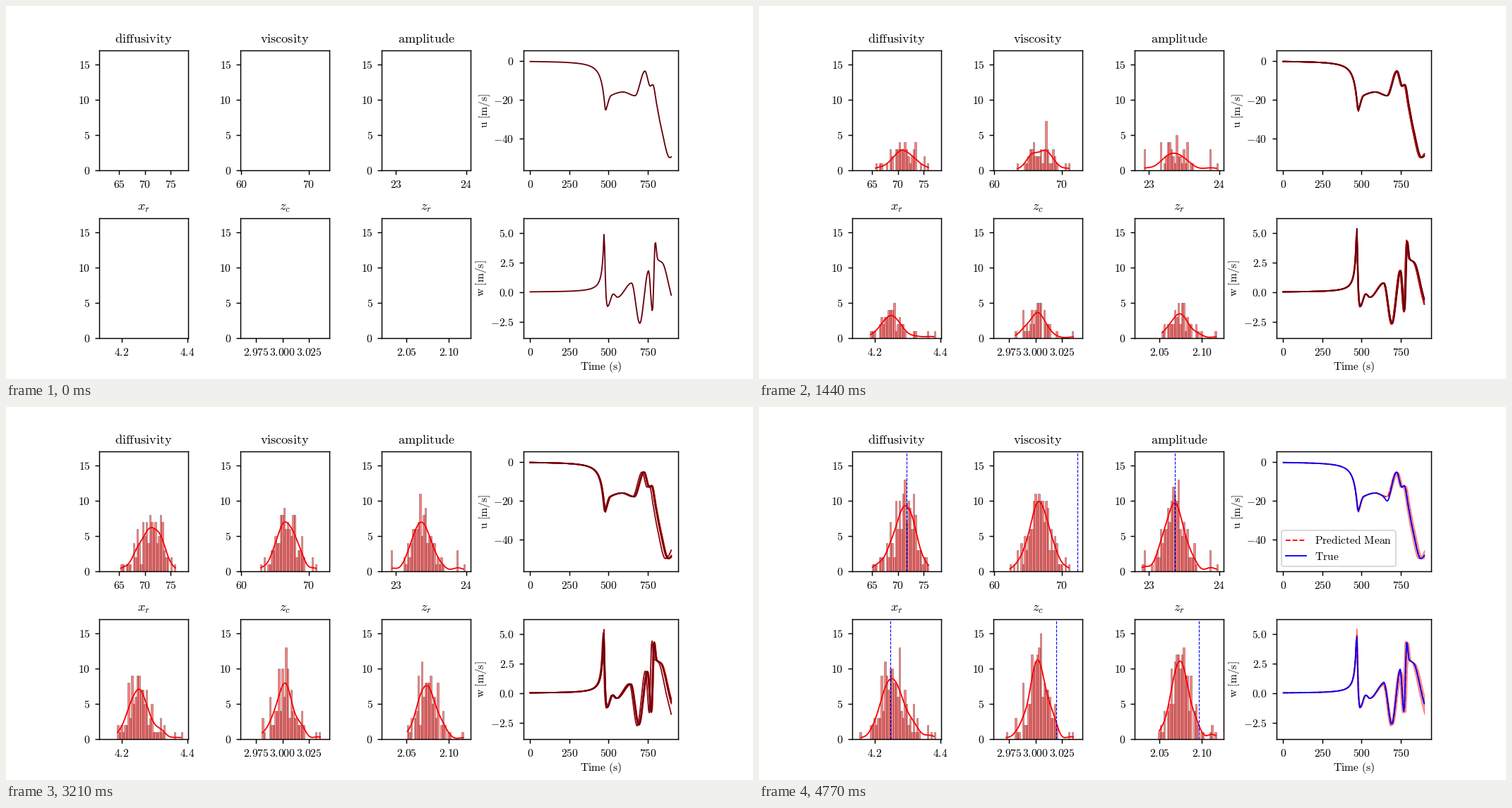
A matplotlib script that plays this animation: 1058x529 px, repeating every 6.45 s.

```python
import numpy as np
import matplotlib.pyplot as plt
from matplotlib.animation import FuncAnimation
from matplotlib.collections import PolyCollection

FRAMES, STEP_MS = 215, 30
RUNS, FADE, WINDOW, BINS = 150, 9, 8, 50

plt.rcParams.update({"font.size": 8.5, "axes.titlesize": 9.9,
                     "axes.labelpad": 1.6, "mathtext.fontset": "cm"})
rng = np.random.default_rng(11)


def rm(text):
    """Upright Computer Modern text."""
    return r"$\mathrm{%s}$" % text.replace(" ", r"\ ")


def smooth(points):
    """Monotone cubic curve through the points."""
    x, y = np.array(points, float).T
    h = np.diff(x)
    d = np.diff(y) / h
    m = np.zeros_like(y)
    m[0], m[-1] = d[0], d[-1]
    i = np.flatnonzero(d[1:] * d[:-1] > 0)
    m[i + 1] = 2 * d[i] * d[i + 1] / (d[i] + d[i + 1])

    def curve(t):
        j = np.clip(np.searchsorted(x, t) - 1, 0, len(h) - 1)
        s = (t - x[j]) / h[j]
        return (y[j] * (1 + 2 * s) * (1 - s) ** 2
                + y[j + 1] * s ** 2 * (3 - 2 * s)
                + h[j] * s * (1 - s) * (m[j] * (1 - s) - m[j + 1] * s))
    return curve


def gust(scale, power, points):
    """Sharp build-up to the first point, then a smooth curve."""
    t0, peak = points[0]
    after = smooth(points)

    def curve(t):
        before = peak / (1 + (np.maximum(t0 - t, 0) / scale) ** power)
        return np.where(t < t0, before, after(np.maximum(t, t0)))
    return curve


u_base = gust(21.3, 1.4, [
    (481, -25.8), (516, -17.8), (593, -16), (669, -17.9), (732, -5.2),
    (766, -13), (782, -12.2), (809, -23.2), (836, -34.4), (890, -49.7),
    (980, -36)])
w_base = gust(9.6, 1.3, [
    (472, 5.36), (484, -.36), (493, -1.2), (530, -.15), (557, -.42),
    (647, .77), (699, -2.63), (755, 1.81), (780, -1.61), (798, 4.28),
    (813, 2.79), (845, 2.46), (900, -.24), (980, -4)])

time = np.linspace(0, 900, 200)


def warped(shift):
    """Times read earlier by an amount that grows along the run."""
    return time + shift * (time / 800) ** 2.2


def u_run(shift):
    return u_base(warped(shift))


def w_run(shift):
    return w_base(warped(shift)) * (1 + .002 * shift)


def bump(center, width):
    return np.exp(-.5 * ((time - center) / width) ** 2)


shifts = 8 + 3.5 * rng.standard_t(4, RUNS + 1)
shifts[0] = 0


def draw_samples(mode, sd, skew, low, high):
    """Shuffled draws from a skewed bell; both extremes arrive late."""
    z = rng.normal(size=6000)
    pool = mode + sd * (z + .05 * z ** 3 + skew * z ** 2)
    pool = pool[(pool > low) & (pool < high)]
    rank = (np.arange(RUNS) + .5 + rng.normal(0, 3, RUNS)) / RUNS
    x = rng.permutation(np.quantile(pool, np.clip(rank, .003, .997)))
    x[RUNS // 4], x[RUNS * 3 // 4] = high, low
    return x


# title, x limits, x ticks, true value, (mode, sd, skew, low, high)
PARAMS = [
    (rm("diffusivity"), (61.2, 78.35), "65 70 75", 71.64,
     (71.2, 2.1, -.12, 65.1, 75.9)),
    (rm("viscosity"), (59.88, 73.05), "60 70", 72.34,
     (66.75, 1.48, 0, 62.3, 71.05)),
    (rm("amplitude"), (22.804, 24.06), "23 24", 23.374,
     (23.36, .136, .04, 22.905, 23.96)),
    ("$x_r$", (4.1314, 4.4026), "4.2 4.4", 4.248,
     (4.256, .035, .1, 4.158, 4.381)),
    ("$z_c$", (2.9603, 3.0443), "2.975 3.000 3.025", 3.0197,
     (3.0025, .0083, 0, 2.9722, 3.0357)),
    ("$z_r$", (2.0208, 2.1254), "2.05 2.10", 2.0963,
     (2.0745, .0102, .05, 2.0495, 2.1163)),
]

# 1058 x 529 pixels
fig = plt.figure(figsize=(8, 4), dpi=132.25, facecolor="white")
grid = fig.add_gridspec(2, 4, width_ratios=[1, 1, 1, 1.75],
                        wspace=.5, hspace=.4)


def set_ticks(ax, xticks, yticks):
    for put, names in ((ax.set_xticks, xticks), (ax.set_yticks, yticks)):
        names = names.split()
        put([float(n) for n in names], [rm(n) for n in names])


class Histogram:
    def __init__(self, cell, title, xlim, xticks, true, shape):
        self.data = draw_samples(*shape)
        self.edges = np.linspace(*xlim, BINS + 1)
        ax = fig.add_subplot(cell)
        ax.set_title(title)
        set_ticks(ax, xticks, "0 5 10 15")
        self.bars = PolyCollection([], facecolors=(1, 0, 0, .5),
                                   edgecolors=(0, 0, 0, .5), linewidths=.3)
        ax.add_collection(self.bars, autolim=False)
        self.kde, = ax.plot([], [], color="red", lw=1)
        self.true = ax.axvline(true, color="blue", ls="--", lw=.6, zorder=3)
        ax.set(xlim=xlim, ylim=(0, 17))

    def show(self, n, done):
        x = self.data[:n]
        counts, _ = np.histogram(x, self.edges)
        self.bars.set_verts([
            [(a, 0), (a, c), (b, c), (b, 0)]
            for a, b, c in zip(self.edges, self.edges[1:], counts) if c])
        if n > 2:
            width = x.std(ddof=1) * n ** -.2
            at = np.linspace(x.min(), x.max(), 200)
            z = (at[:, None] - x) / width
            density = np.exp(-.5 * z ** 2).sum(1) / (width * np.sqrt(2 * np.pi))
            self.kde.set_data(at, density * (self.edges[1] - self.edges[0]))
        else:
            self.kde.set_data([], [])
        self.true.set_visible(done)


class Series:
    def __init__(self, cell, label, ylim, yticks, run, true):
        self.runs = [run(s) for s in shifts]
        ax = self.ax = fig.add_subplot(cell)
        ax.set_ylabel(rm(label))
        set_ticks(ax, "0 250 500 750", yticks)
        shades = plt.cm.Reds(np.linspace(.45, 1, WINDOW))
        self.lines = [ax.plot([], [], color=c, lw=1)[0] for c in shades]
        spread = [run(s) for s in np.linspace(-1, 24, 9)]
        self.band = ax.fill_between(time, np.min(spread, 0), np.max(spread, 0),
                                    color="red", lw=.5, zorder=2.1)
        self.mean, = ax.plot(time, run(9), "--", color="red", lw=1, zorder=3)
        self.true, = ax.plot(time, true, color="blue", lw=1, zorder=3)
        ax.set(xlim=(-45, 945), ylim=ylim)

    def show(self, n, done, fade):
        for age, line in enumerate(reversed(self.lines)):
            if age <= n:
                line.set_data(time, self.runs[n - age])
            else:
                line.set_data([], [])
            line.set_alpha(1 - fade)
            line.set_visible(fade < 1)
        self.band.set_alpha(.4 * fade)
        for artist in (self.band, self.mean, self.true):
            artist.set_visible(done)


hists = [Histogram(grid[i // 3, i % 3], *p) for i, p in enumerate(PARAMS)]
u_plot = Series(grid[0, 3], "u [m/s]", (-56.3, 5.2), "0 -20 -40", u_run,
                u_run(10) - 2.3 * bump(668, 16))
w_plot = Series(grid[1, 3], "w [m/s]", (-3.86, 6.24), "5.0 2.5 0.0 -2.5",
                w_run, w_run(10) + .25 * bump(662, 20) + .2 * bump(750, 12))
w_plot.ax.set_xlabel(rm("Time (s)"))
legend = u_plot.ax.legend([u_plot.mean, u_plot.true],
                          [rm("Predicted Mean"), rm("True")],
                          loc="lower left", handlelength=1.88, borderpad=.38,
                          handletextpad=.75, borderaxespad=.47)


def update(k):
    n, done = min(k, RUNS), k > RUNS
    fade = min(max((k - RUNS) / FADE, 0), 1)
    for hist in hists:
        hist.show(n, done)
    for plot in (u_plot, w_plot):
        plot.show(n, done, fade)
    legend.set_visible(done)
    return []


anim = FuncAnimation(fig, update, frames=FRAMES, interval=STEP_MS,
                     init_func=lambda: update(0), repeat=True)
plt.show()
```
